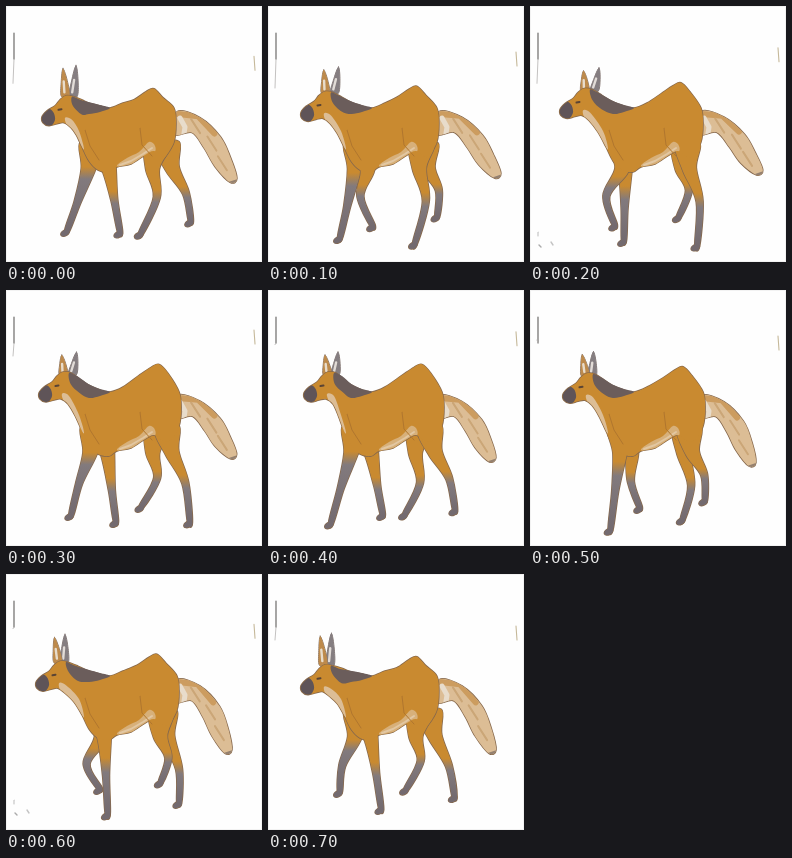
An HTML page with a canvas that plays this animation: 256x256 px, repeating every 0.8 s.

```html
<!DOCTYPE html>
<html lang="en">
<head>
<meta charset="utf-8">
<title>Walking maned wolf</title>
<style>
html, body { margin: 0; width: 100%; height: 100%; overflow: hidden; background: #fefefe; }
canvas { display: block; width: 100vw; height: 100vh; }
</style>
</head>
<body>
<canvas id="stage"></canvas>
<script>
const canvas = document.getElementById('stage');
const ratio = window.devicePixelRatio || 1;
canvas.width = canvas.height = 256 * ratio;
const ctx = canvas.getContext('2d');
ctx.scale(ratio, ratio);
ctx.lineJoin = ctx.lineCap = 'round';

const STEP = 100, STEPS = 8;
const FUR = '#c98a30', SHADE = '#b0762e', LINE = '#86684c', GRAY = '#827a7d',
      DARK = '#5f5458', CREAM = '#dcbd95', PALE = '#e8dccb';

// Each leg swings through the same cycle, offset by its start step.
const FRONT = { x: 91, reach: 27, bounce: 3, bend: 14, root: 90,
                knee: [94, 0.4, 164], ankle: [0, 0, 196] };
const HIND = { x: 161, reach: 27, bounce: 0, bend: 0, root: 156,
               knee: [157, 0.4, 163], ankle: [166, 0.58, 190] };
const farFront = { ...FRONT, start: 0, floor: 225, lift: 10 };
const nearFront = { ...FRONT, start: 3.6, floor: 230, lift: 11 };
const farHind = { ...HIND, start: 3.4, floor: 220, lift: 10 };
const nearHind = { ...HIND, start: 7.7, floor: 224, lift: 16 };

const angle = (step, start) => (step - start) * 2 * Math.PI / STEPS;
const wave = (step, peak) => Math.cos(angle(step, peak));
const shift = (pts, [dx, dy], k = 1) => pts.map(([x, y]) => [x + dx * k, y + dy * k]);

// Closed Catmull-Rom curve through the points.
function blob(pts) {
  const n = pts.length, at = i => pts[(i + n) % n], path = new Path2D();
  path.moveTo(...pts[0]);
  for (let i = 0; i < n; i++) {
    const [a, b, c, d] = [at(i - 1), at(i), at(i + 1), at(i + 2)];
    path.bezierCurveTo(b[0] + (c[0] - a[0]) / 6, b[1] + (c[1] - a[1]) / 6,
                       c[0] - (d[0] - b[0]) / 6, c[1] - (d[1] - b[1]) / 6, c[0], c[1]);
  }
  path.closePath();
  return path;
}

// Tapered shape along a spine.
function limb(spine, widths) {
  const left = [], right = [];
  spine.forEach(([x, y], i) => {
    const a = spine[Math.max(i - 1, 0)], b = spine[Math.min(i + 1, spine.length - 1)];
    const dx = b[0] - a[0], dy = b[1] - a[1], k = widths[i] / 2 / Math.hypot(dx, dy);
    left.push([x - dy * k, y + dx * k]);
    right.unshift([x + dy * k, y - dx * k]);
  });
  return blob(left.concat(right));
}

function fill(path, color) {
  ctx.fillStyle = color;
  ctx.fill(path);
}

function stroke(path, color = LINE, width = 1.5) {
  ctx.strokeStyle = color;
  ctx.lineWidth = width;
  ctx.stroke(path);
}

function line(pts, color, width) {
  const path = new Path2D();
  pts.forEach(p => path.lineTo(...p));
  stroke(path, color, width);
}

function leg(step, g, widths, sock) {
  const turn = angle(step, g.start), rise = Math.sin(turn);
  const toe = [g.x - g.reach * Math.cos(turn) - g.bounce * Math.cos(2 * turn),
               g.floor + g.lift * rise];
  const [kx, follow, ky] = g.knee, [ax, trail, ay] = g.ankle;
  const knee = [kx + (toe[0] - g.x) * follow, ky];
  const fold = g.bend * Math.max(0, -rise) ** 3;
  const ankle = [ax ? ax + (toe[0] - g.x) * trail : (knee[0] + toe[0]) / 2 - fold, ay + 6 * rise];
  const hip = [(knee[0] + g.root) / 2, 138];

  const paint = ctx.createLinearGradient(0, hip[1], 0, toe[1]);
  const reach = sock ?? Math.max(0, (toe[0] - 55) / 65);
  const cut = (knee[1] + (ankle[1] - knee[1]) * reach - hip[1]) / (toe[1] - hip[1]);
  paint.addColorStop(cut - 0.07, FUR);
  paint.addColorStop(cut + 0.07, GRAY);
  paint.addColorStop(1, '#736a6f');
  const paw = new Path2D();
  paw.ellipse(toe[0] - 2, toe[1] + 2, 4.5, 2.8, -0.5, 0, 7);
  return { shapes: [limb([hip, knee, ankle, toe], widths), paw], paint };
}

const frontLeg = (step, g) => leg(step, g, [24, 14, 7, 5]);
const hindLeg = (step, g) => leg(step, g, [24, 14, 7, 5], 0.95);
const outlineLeg = l => l.shapes.forEach(s => stroke(s));
const fillLeg = l => l.shapes.forEach(s => fill(s, l.paint));

function drawTail(step) {
  const sway = [4 * wave(step, 1.5), -6 * wave(step, 2.5)];
  const rest = [[170, 117], [190, 119], [206, 136], [216, 155], [226, 172]];
  const spine = rest.map((p, i) => shift([p], sway, (i / 4) ** 2)[0]);
  const path = limb(spine, [23, 17, 20, 18, 8]);
  stroke(path);
  fill(path, CREAM);
  ctx.save();
  ctx.clip(path);
  line(shift(spine.slice(0, 3), [2, -9]), '#cc9c5f', 6);
  spine.slice(1, 4).forEach(([x, y]) => line([[x - 5, y - 6], [x + 4, y + 8]], '#cba677', 2));
  line([[174, 112], [179, 121], [177, 134]], PALE, 5);
  const [x, y] = spine[4];
  line([[x - 5, y + 3], [x + 4, y]], '#94806f', 2.5);
  ctx.restore();
}

function drawEar([x, y], head, color, inner) {
  const bx = x * 0.6 + (head[0] + 62) * 0.4, by = head[1] * 0.7 + 85;
  const mx = (x + bx) / 2, my = (y + by) / 2;
  const path = blob([[x, y], [mx + 3.5, my], [bx + 4, by], [bx - 4, by], [mx - 3, my]]);
  stroke(path, '#857873', 1);
  fill(path, color);
  line([[mx - 0.5, my - 1], [bx - 1, by - 4]], inner, 2.4);
}

function drawBody(head, [hx, hy], near) {
  const skull = shift([[64, 114], [57, 109], [50, 110], [42, 112], [36, 109], [35, 103], [40, 97],
                       [48, 92], [53, 86], [59, 82], [67, 83]], head);
  const back = [...shift([[75, 89]], head, 0.6), ...shift([[83, 95]], head, 0.3), [94, 100],
                [104, 102], [117, 97], [hx - 20, hy + 11], [hx - 8, hy + 3], [hx, hy], [hx + 9, hy + 9]];
  const rump = shift([[20, 102], [22, 118], [20, 136], [12, 150]], [hx, 0]);
  const belly = [[157, 151], [148, 145], [139, 149], [125, 158], [111, 161], [103, 166],
                 [92, 164], [83, 155], [76, 141], ...shift([[70, 126]], head, 0.4)];
  const body = blob([...skull, ...back, ...rump, ...belly]);

  near.forEach(outlineLeg);
  stroke(body);
  near.forEach(fillLeg);
  fill(body, FUR);

  ctx.save();
  ctx.clip(body);
  fill(blob([[111, 160], [121, 152], [133, 146], [143, 136], [149, 140], [147, 148], [126, 161]]), '#d7b07a');
  line([[114, 159], [125, 155], [137, 148], [146, 142]], '#e2c7a2', 2);
  fill(blob([...shift([[58, 104], [65, 106]], head), [73, 125], [78, 143], [72, 136],
             ...shift([[61, 114]], head)]), CREAM);
  fill(blob(shift([[33, 103], [40, 95], [46, 98], [48, 106], [43, 113], [35, 111]], head)), DARK);
  ctx.restore();

  fill(blob([...shift([[65, 83], [73, 86]], head), ...shift([[83, 94]], head, 0.3), [94, 99],
             [104, 102], [94, 106], [83, 108], ...shift([[75, 103], [66, 94]], head, 0.7)]), '#6b5d5b');
  line(shift([[51.5, 96], [54.5, 95.5]], head), '#5a4434', 2);
  line([[79, 124], [84, 140], [93, 154]], SHADE, 1);
  line([[134, 122], [136, 139], [146, 150]], SHADE, 1);
}

function drawPaper(step) {
  ctx.fillStyle = '#fefefe';
  ctx.fillRect(0, 0, 256, 256);
  ctx.strokeStyle = '#f2f2f2';
  ctx.lineWidth = 2;
  ctx.strokeRect(0, 0, 256, 256);
  const fade = 66 + 16 * wave(step, 1), side = 46 + 6 * wave(step, 7);
  line([[8, 27], [8, 53]], '#6c6a68', 1.2);
  line([[8, 53], [7, fade]], '#b4b2b0', 0.8);
  line([[248, side], [249, side + 14]], '#c5b899', 1.1);
  // Dust appears twice per stride.
  if (step % 4 === 2) {
    line([[8, 226], [8, 230]], '#bbbbbb', 1);
    line([[9, 239], [11, 241]], '#aaaaaa', 1.4);
    line([[21, 236], [23, 239]], '#c4c4c4', 1.4);
  }
}

function draw(step) {
  const nod = (0.5 + 0.5 * wave(step, 7.3)) ** 2;
  const head = [-2 - 3 * wave(2 * step, 4), 9 * nod];
  const hump = [151 + 3 * wave(step, 4), 78.5 - 4.5 * wave(step, 3.5)];
  const flick = wave(step, 2), earY = 65 - 3 * nod;

  drawPaper(step);
  drawTail(step);
  [frontLeg(step, farFront), hindLeg(step, farHind)].forEach(l => {
    outlineLeg(l);
    fillLeg(l);
  });
  drawEar([head[0] + 69 + 5 * flick, earY - 3], head, '#857e81', '#e2dcd7');
  drawEar([head[0] + 56 + 2.5 * flick, earY], head, '#bd8a4c', PALE);
  drawBody(head, hump, [frontLeg(step, nearFront), hindLeg(step, nearHind)]);
}

let shown = -1;
function tick(now) {
  const step = Math.floor(now / STEP) % STEPS;
  if (step !== shown) draw(shown = step);
  requestAnimationFrame(tick);
}
draw(0);
requestAnimationFrame(tick);
</script>
</body>
</html>
```
